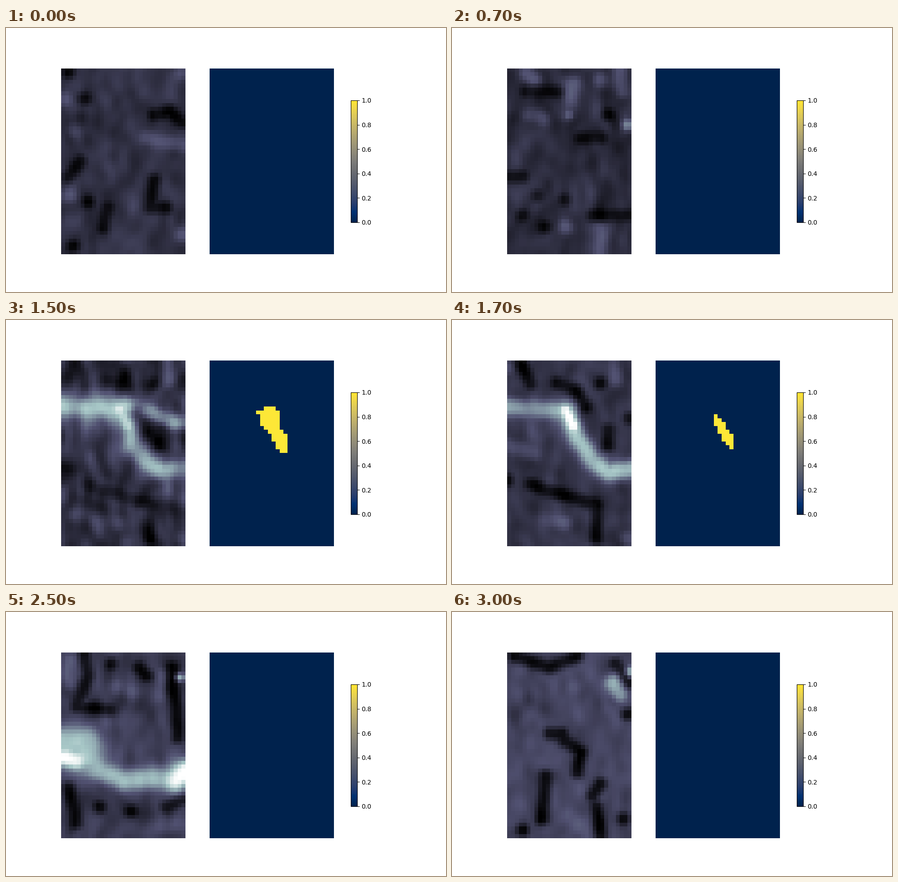
Recreate the animation shown at these times as a matplotlib script. Size 966 by 580 pixels, loop 3.1 s.

```python
import numpy as np
import matplotlib.pyplot as plt
from matplotlib.animation import FuncAnimation

ROWS, COLS, SLICES = 48, 32, 31
Y, X = np.mgrid[0:ROWS, 0:COLS] + 0.5


def distance(points):
    """Distance of every cell to a polyline given as x, y, x, y, ..."""
    p = np.reshape(points, (-1, 2)).astype(float)
    best = np.full(X.shape, np.inf)
    for (x0, y0), (x1, y1) in zip(p, p[1:] if len(p) > 1 else p):
        dx, dy = x1 - x0, y1 - y0
        length = dx * dx + dy * dy or 1
        t = np.clip(((X - x0) * dx + (Y - y0) * dy) / length, 0, 1)
        best = np.minimum(best, np.hypot(X - x0 - t * dx, Y - y0 - t * dy))
    return best


def falloff(points, width):
    return np.exp(-(distance(points) / width) ** 2.5)


def scene(base, dark, light, vessels=()):
    """Dark and light patches on a flat level, then vessels with a halo."""
    field = np.full(X.shape, base)
    for points in light:
        field += falloff(points, 2) * (0.36 - field)
    for points in dark:
        field += falloff(points, 1.8) * (0.04 - field)
    for level, width, *points in vessels:
        for k, spread in ((0.6, 1.5), (1, 1)):
            glow = falloff(points, width * spread)
            field += glow * np.maximum(k * level - field, 0)
    return field


def smooth(a, axis, passes):
    for _ in range(passes):
        a = (np.roll(a, 1, axis) + 2 * a + np.roll(a, -1, axis)) / 4
    return a


def signed_distance(mask):
    cells = np.column_stack([X.ravel(), Y.ravel()])
    inside = mask.ravel()

    def to(target):
        gap = cells[:, None] - cells[target][None]
        return np.hypot(gap[..., 0], gap[..., 1]).min(axis=1)

    return np.where(inside, to(~inside), -to(inside)).reshape(mask.shape)


def span(top, bottom):
    """Cells between two stepped edges, each given as x, y, x, y, ..."""
    edges = [np.round(np.interp(X - 0.5, e[::2], e[1::2])) for e in (top, bottom)]
    inside = (X > top[0]) & (X < top[-2] + 1)
    return inside & (Y > edges[0]) & (Y < edges[1])


scenes = {
    0: scene(
        0.22,
        [(2, 1), (6, 8), (24, 12, 28, 11, 31, 14), (2, 28, 5, 24), (7, 34.5),
         (12, 36, 11, 41), (24, 29, 23, 36, 27, 36), (3, 46)],
        [(31, 1), (1, 8), (22, 18, 31, 20), (3, 16), (2, 33), (31, 43)]),
    7: scene(
        0.2,
        [(5, 6, 13, 6), (26, 12), (19, 18, 24, 18), (1, 28, 4, 28), (8, 33),
         (15, 34), (22, 38, 31, 38), (4, 38), (10, 41)],
        [(5, 1, 7, 3), (17, 4, 16, 12), (6, 12, 9, 13), (24, 3),
         (29, 0, 30, 6), (15, 41), (24, 41, 24, 47)],
        [(.55, 1.3, 31, 14.7), (.5, 1, 16, 12)]),
    12: scene(
        0.19,
        [(12, 5, 16, 5, 23, 7), (23, 19, 26, 23), (29, 11), (1, 28), (16, 30),
         (2, 38), (18, 36, 24, 37), (16, 45)],
        [(27, 1, 27, 6), (31, 2), (13, 35), (31, 36), (25, 45)],
        [(.6, 1.7, 17, 16, 18, 22, 24, 28.5, 32, 27), (.7, 4, 0, 12, 14, 13.5),
         (.92, 2.5, 7, 12, 13, 12), (1, 1.5, 14, 11.5, 19, 11.6, 29, 16, 32, 15.6)]),
    17: scene(
        0.24,
        [(4, 1, 6, 6), (13, 6, 18, 8, 20, 12), (24, 6), (26, 18, 26, 22),
         (31.5, 15), (0, 31), (6, 32, 15, 35, 22, 37), (23, 38, 23, 46)],
        [(0, 2), (28, 0, 28, 5), (0, 22, 7, 24), (10, 41, 15, 42), (31, 46)],
        [(.6, 2, 0, 12, 14, 13), (.72, 2, 15, 13, 18, 20, 22, 26, 26, 29, 32, 28),
         (1, 1.2, 15, 13, 17, 17)]),
    21: scene(
        0.28,
        [(3, 0, 8, 8), (8, 0, 11, 6), (13, 7), (18, 13, 21, 9), (4, 12),
         (9, 11), (28, 5), (30, 15, 26, 23), (1, 31, 8, 38, 14, 38),
         (8, 34, 14, 37), (24, 40), (15, 45)],
        [(14, 2, 19, 2), (25, 8), (22, 21), (29, 41, 28, 46)],
        [(.6, 1.2, 31, 0), (.55, 2.5, 0, 18, 8, 22),
         (.66, 2.2, 1, 25, 16, 32, 23, 34, 32, 33), (.88, 1.6, 1, 26, 5, 27.5),
         (.88, 1.6, 30, 33, 32, 32)]),
    25: scene(
        0.27,
        [(6, 0, 7, 6, 4, 14, 12, 15), (13, 3), (20, 4, 22, 6),
         (28.5, 4, 30, 22), (2, 35, 4, 44), (10, 40), (18, 41), (27, 40, 31, 38)],
        [(2, 2, 2, 8), (14, 9), (18, 10), (26, 6, 26, 11), (26, 45, 31, 44)],
        [(.7, .9, 30.7, 6.5), (.75, 3.4, 1, 23, 6, 23, 7, 28),
         (1, 2, 1, 27, 4, 28), (.7, 2.4, 8, 30, 16, 33, 30, 32),
         (1, 2.4, 29, 33, 32, 31)]),
    30: scene(
        0.31,
        [(2, 1, 11, 4, 18, 1), (28, 3, 31, 8), (31, 16), (11, 21, 14, 21),
         (15, 23, 19, 26, 18, 31), (10, 32, 9, 43), (4, 46), (22, 37, 24, 34),
         (23, 40, 24, 47), (30, 43)],
        [(27, 15, 30, 21), (30, 28), (18, 9), (10, 28), (16, 42, 20, 46)],
        [(.65, 1.8, 27, 8, 29, 11), (.7, 1.2, 32, 5)]),
}

# Forked vessel minus the gap between its branches, then a short remnant.
outer = span((0, 8, 2, 7, 9, 7, 13, 8.4, 14, 9, 19, 9, 28, 14, 29, 13, 31, 13),
             (0, 16, 1, 16.6, 6, 17.4, 13, 19.2, 15, 23, 20, 28, 21, 29, 31, 30))
gap = span((19, 16, 21, 16.4, 28, 20, 29, 19, 31, 19),
           (19, 19, 22, 25, 24, 27, 28, 27, 30, 25))
fork = signed_distance(outer & ~gap)
sliver = signed_distance(span((15, 14, 19, 19), (15, 17, 17, 21, 19, 23)))
shapes = {0: fork - 30, 7: fork - 8, 12: fork, 17: sliver, 21: sliver - 12,
          30: sliver - 30}

noise = np.random.default_rng(4).normal(size=(SLICES, ROWS, COLS))
for axis, passes in enumerate((2, 5, 2)):
    noise = smooth(noise, axis, passes)
noise /= noise.std()


def between(keys, s):
    """Linear mix of the two keyed arrays around slice s, and its fraction."""
    marks = sorted(keys)
    i = min(np.searchsorted(marks, s, side="right"), len(marks) - 1)
    a, b = marks[i - 1], marks[i]
    t = (s - a) / (b - a)
    return (1 - t) * keys[a] + t * keys[b], t


def scan(s):
    field, t = between(scenes, s)
    grain = 0.03 + 0.1 * t * (1 - t)
    return np.clip(field + grain * noise[s], 0, 1)


def label(s):
    return (between(shapes, s)[0] > 0).astype(float)


fig, axes = plt.subplots(1, 2, figsize=(9.66, 5.8), dpi=100)
left = axes[0].imshow(scan(0), cmap="bone", vmin=0, vmax=1)
right = axes[1].imshow(label(0), cmap="cividis", vmin=0, vmax=1)
for ax in axes:
    ax.axis("off")
fig.colorbar(right, ax=axes, shrink=0.6)


def update(s):
    left.set_data(scan(s))
    right.set_data(label(s))
    return left, right


anim = FuncAnimation(fig, update, frames=SLICES, interval=100, repeat=True,
                     repeat_delay=0)
plt.show()
```
